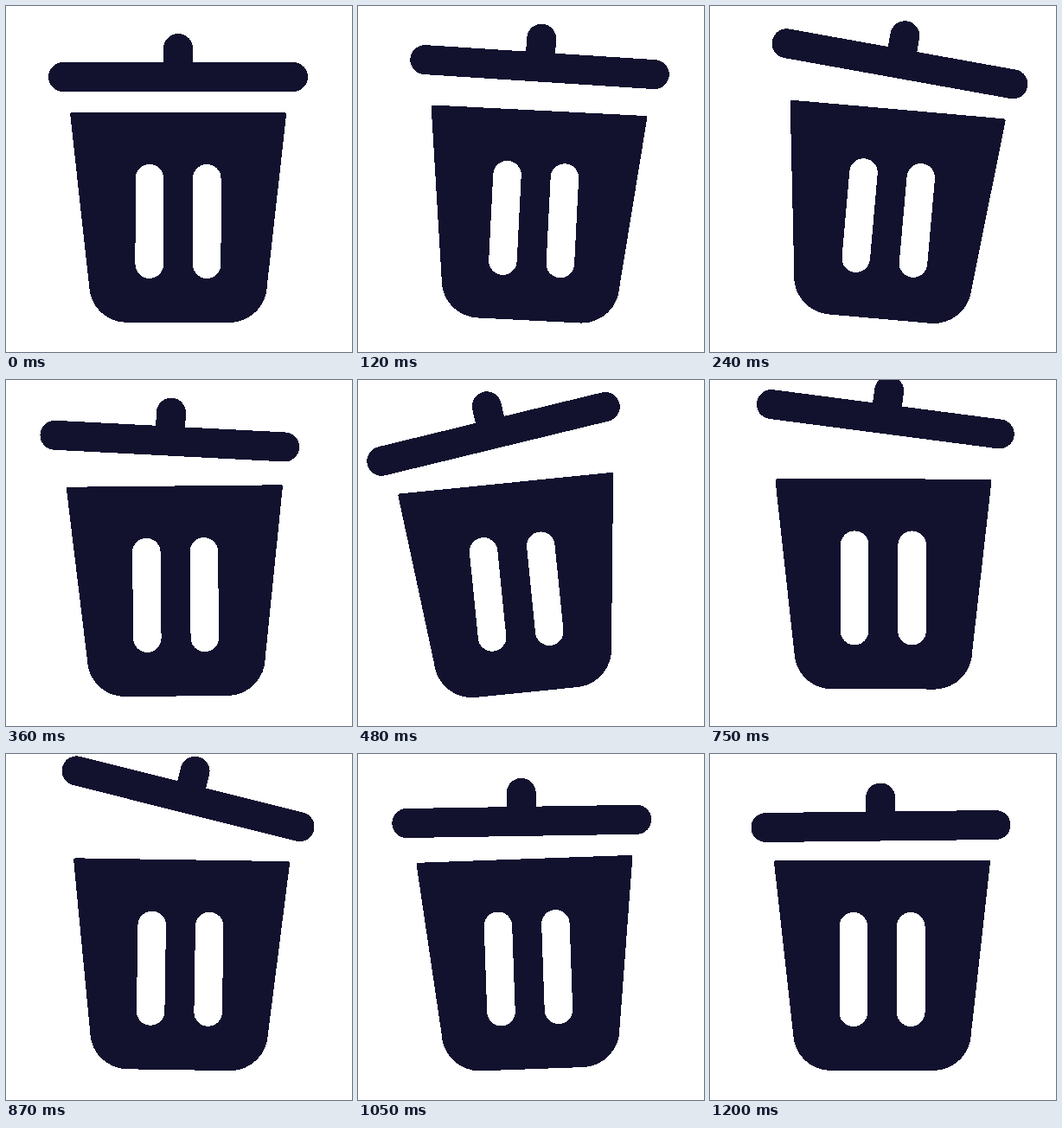
An HTML page for the animation above (3.23 s loop, 400x400 px).

```html
<!DOCTYPE html>
<html lang="en">
<head>
<meta charset="utf-8">
<title>Rattling bin</title>
<style>
  html, body { margin: 0; width: 100%; height: 100%; overflow: hidden; background: #fff; }
  svg { display: block; width: 100%; height: 100%; }
</style>
</head>
<body>
<svg viewBox="0 0 400 400" fill="#12122f" shape-rendering="crispEdges">
  <!-- body: origin at the middle of its base -->
  <g id="body">
    <path d="M-123-243H123Q125-243 125-241L103-44A44 44 0 0 1 61 0H-59A44 44 0 0 1 -103-44L-125-241Q-125-243-123-243Z"/>
    <g fill="#fff">
      <rect x="-49.5" y="-183" width="32.5" height="132" rx="16.25"/>
      <rect x="17" y="-183" width="32.5" height="132" rx="16.25"/>
    </g>
  </g>
  <!-- lid: origin at the middle of the bar -->
  <g id="lid">
    <rect x="-150" y="-17" width="300" height="34" rx="17"/>
    <rect x="-17" y="-50" width="34" height="60" rx="17"/>
    <rect x="-17" y="-25" width="34" height="30"/>
  </g>
</svg>
<script>
  const LOOP = 3230, STEP = 30, REST = 1200;
  const CENTRE = 199, FLOOR = 366, LID_Y = 82;

  // moments at which the rocking changes direction
  const beats = [0, 250, 495, 860, 1050, REST];

  const clamp = u => Math.max(0, Math.min(1, u));
  const ease = u => u < 0.5 ? 2 * u * u : 1 - 2 * (1 - u) * (1 - u);

  // swing from one extreme to the next on the beats, early or late by lag
  function swing(t, lag, extremes) {
    const s = t - lag;
    let i = 0;
    while (i < beats.length - 2 && s >= beats[i + 1]) i++;
    const u = clamp((s - beats[i]) / (beats[i + 1] - beats[i]));
    return extremes[i] + (extremes[i + 1] - extremes[i]) * ease(u);
  }

  // parabola of a throw: 0 at both ends, 1 in the middle
  function arc(t, from, to) {
    const u = clamp((t - from) / (to - from));
    return 4 * u * (1 - u);
  }

  function place(id, x, y, angle) {
    document.getElementById(id).setAttribute('transform',
      `translate(${x.toFixed(2)} ${y.toFixed(2)}) rotate(${angle.toFixed(3)})`);
  }

  // the body rocks on its rounded bottom corners, skids left and hops once
  function drawBody(t) {
    const tilt = swing(t, -15, [0, 5.05, -5.75, 1, -2.1, 0]);
    const s = Math.sin(tilt * Math.PI / 180);
    const skid = 1.3 * arc(t, 0, REST) - 9.8 * arc(t, 330, 655);
    const hop = 10 * arc(t, 500, 860);
    place('body', CENTRE - 44 * s + skid, FLOOR - 50 * Math.abs(s) - hop, tilt);
  }

  // the lid is bumped up, then thrown, and comes down slightly askew
  function drawLid(t) {
    const tilt = swing(t, 15, [0, 10.4, -14.4, 14.1, -1.1, -0.64]);
    const shift = swing(t, -10, [0, 20.5, -42.5, 12, -9.8, -1.5]);
    const lift = 15.2 * arc(t, 0, 480) + 37 * arc(t, 370, 1070);
    const sag = 1.5 * ease(clamp((t - 1070) / 130));
    place('lid', CENTRE + shift, LID_Y - lift + sag, tilt);
  }

  function draw(time) {
    const t = Math.min(REST, Math.floor(time % LOOP / STEP) * STEP);
    drawBody(t);
    drawLid(t);
  }

  const start = performance.now();
  function tick() {
    draw(performance.now() - start);
    requestAnimationFrame(tick);
  }
  draw(0);
  requestAnimationFrame(tick);
</script>
</body>
</html>
```
